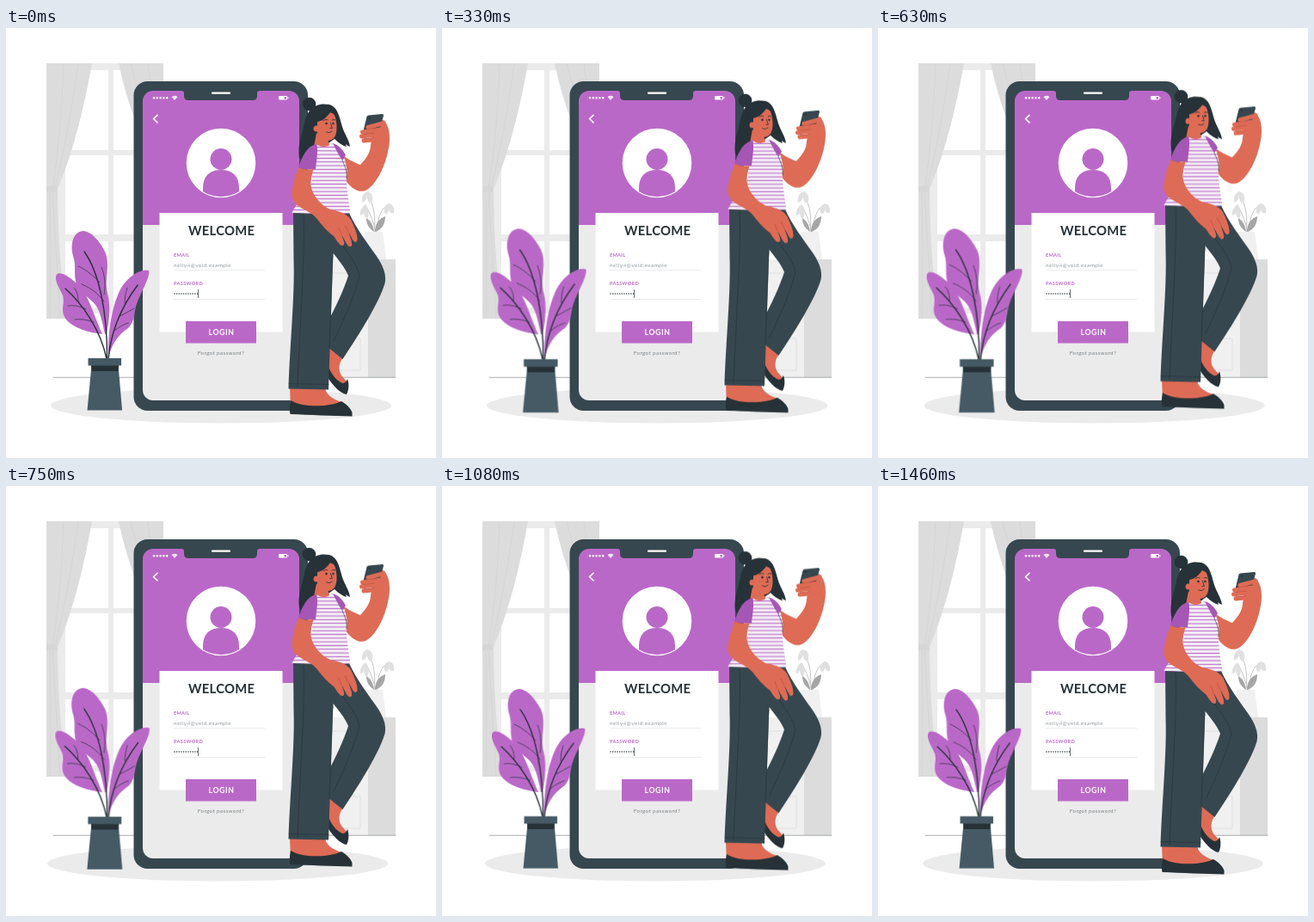
An HTML page for the animation above (1500 ms loop, 500 by 500 pixels).

```html
<!DOCTYPE html>
<html lang="en">
<head>
<meta charset="utf-8">
<title>Login</title>
<style>
html, body { margin: 0; width: 100%; height: 100%; overflow: hidden; background: #fff; }
svg { display: block; width: 100vw; height: 100vh; }
text { font-family: Lato, sans-serif; }
.accent { fill: #ba68c8; }
.slate { fill: #37474f; }
.ink { fill: #263238; }
.skin { fill: #de6b55; }
.line { fill: none; stroke: #263238; stroke-linecap: round; stroke-linejoin: round; }
.mid { text-anchor: middle; }
.bold { font-weight: 700; }

.shadow { animation: shake 1.5s ease infinite; }
.plant { transform-origin: 112px 342px; animation: swell 1.5s ease-in-out -30ms infinite; }
.woman { animation: float 1.5s ease-in-out -30ms infinite; }

@keyframes shake {
  0%, 100% { transform: translateX(0); }
  10%, 90% { transform: translateX(-1px); }
  20%, 80% { transform: translateX(2px); }
  30%, 50%, 70% { transform: translateX(-4px); }
  40%, 60% { transform: translateX(4px); }
}
@keyframes swell {
  0%, 58%, 100% { transform: scale(1); }
  20%, 45% { transform: scale(1.025); }
}
@keyframes float {
  0%, 100% { transform: translateY(0); }
  50% { transform: translateY(-9px); }
}
</style>
</head>
<body>
<svg viewBox="0 0 500 500">
  <defs>
    <pattern id="stripes" width="10" height="4.3" y="3.1" patternUnits="userSpaceOnUse">
      <path fill="#f5f0f6" d="M0 0h10v4.3H0z"/>
      <path class="accent" d="M0 1.6h10v1.1H0z"/>
    </pattern>
    <clipPath id="avatar"><circle cx="250" cy="157" r="39.3"/></clipPath>
  </defs>

  <!-- window -->
  <g>
    <path fill="#ebebeb" d="M60 41H183V332H60z"/>
    <path fill="#fff" d="M69 49h50v93H69zM125 49h51v93h-51zM69 148h50v92H69zM125 148h51v92h-51zM69 248h50v77H69zM125 248h51v77h-51z"/>
    <path fill="#dcdcdc" d="M47 41H100C92 86 80 140 60 187C60 240 64 290 71 338H47z"/>
    <path fill="none" stroke="#d0d0d0" stroke-width=".6" d="M67 41C65 100 60 150 54 186M84 41C76 100 66 150 57 186M54 190C57 240 60 290 63 338M51 190C52 240 52 290 51 338"/>
    <path fill="#d6d6d6" d="M47 184h12.500v7H47z"/>
    <path fill="#dcdcdc" d="M131 41H183V190C168 150 143 100 131 41z"/>
    <path fill="none" stroke="#d0d0d0" stroke-width=".6" d="M145 41C148 54 152 70 158 85M165 41L170 80"/>
  </g>

  <!-- cabinet and flowers -->
  <g>
    <path fill="#f0f0f0" d="M345 269h80v137h-80z"/>
    <path fill="#dcdcdc" d="M421 269h32v137h-32z"/>
    <path fill="none" stroke="#dcdcdc" stroke-width=".8" d="M360 361h52v37h-52zM360 285h52v60h-52z"/>
    <path fill="#f0f0f0" d="M417 237h21l4 32h-29z"/>
    <path fill="none" stroke="#c4c4c4" stroke-width="1" d="M428 237C430 220 428 205 421 196M430 237C426 222 422 212 418 207M431 237C432 220 438 206 445 207"/>
    <path fill="#e0e0e0" d="M420 190c6 1 8 8 5 14c-4-1-5-4-5-8c-1 4-3 6-6 7c-1-6 1-11 6-13zM418 205c4 4 5 11 2 17c-3-1-4-5-4-8c-1 3-2 4-4 4c-1-5 2-10 6-13zM445 204c5 1 7 5 6 11c-3 1-5-1-6-4c0 3-1 5-4 5c-3-5-1-10 4-12z"/>
    <path fill="#a6a6a6" d="M428 237c-1-8-4-13-9-16c0 7 3 12 9 16zM429 237c0-9 4-15 12-18c0 9-4 16-12 18z"/>
  </g>

  <ellipse class="shadow" cx="250" cy="439" rx="198" ry="20.500" fill="#ebebeb"/>
  <path class="line" stroke-width=".4" d="M55 406.300H453"/>

  <!-- phone -->
  <g>
    <rect class="slate" x="148.500" y="62" width="202.500" height="383" rx="16"/>
    <path fill="#ebebeb" d="M159 228H341V421a12 12 0 0 1-12 12H171a12 12 0 0 1-12-12z"/>
    <path class="accent" d="M159 229V85a12 12 0 0 1 12-12H204q3 0 3 3v3q0 5 5 5H287q5 0 5-5v-3q0-3 3-3H329a12 12 0 0 1 12 12V229z"/>
    <path fill="none" stroke="#fff" stroke-width="2.200" stroke-linecap="round" d="M240 75.700h20"/>
    <path fill="none" stroke="#fff" stroke-width="2.600" stroke-linecap="round" stroke-dasharray="0 3.800" d="M172 81.300h15.500"/>
    <path fill="#fff" opacity=".85" d="M192.500 80q3.500-2.700 7 0l-3.500 4z"/>
    <rect x="317" y="79" width="10" height="4.600" rx="1" fill="#fff"/>
    <path class="accent" d="M323.500 80h2.500v2.600h-2.500z"/>
    <path fill="#fff" d="M327.500 80.300h1v2h-1z"/>
    <path fill="none" stroke="#fff" stroke-width="1.600" stroke-linecap="round" stroke-linejoin="round" d="M176 101.300l-4.500 4.200l4.500 4.300"/>

    <circle cx="250" cy="157" r="40.300" fill="#fff"/>
    <g class="accent" clip-path="url(#avatar)">
      <circle cx="250" cy="152.500" r="12.500"/>
      <path d="M229 198V186C229 172 237 165 250 165S271 172 271 186V198z"/>
    </g>

    <path fill="#fff" d="M178.500 215H321.500V353.500H178.500z"/>
    <text class="ink bold mid" x="250.700" y="241" font-size="14.800" letter-spacing=".3">WELCOME</text>
    <text class="accent bold" x="195" y="266" font-size="5.600" letter-spacing=".3">EMAIL</text>
    <text x="195" y="278.300" font-size="6.400" letter-spacing=".5" font-weight="300" fill="#37474f">nelly4@veld.example</text>
    <text class="accent bold" x="195" y="299.300" font-size="5.600" letter-spacing=".35">PASSWORD</text>
    <path fill="none" stroke="#d4d4d4" stroke-width=".5" d="M195 281.600H301M195 315.500H301"/>
    <path class="line" stroke-width="1.500" stroke-dasharray="0 2.650" d="M196 309h26.600"/>
    <path class="line" stroke-width=".7" d="M223.500 304.500v9"/>
    <path class="accent" d="M209 341h82v25.500h-82z"/>
    <text class="bold mid" x="250.500" y="357.300" font-size="8.700" letter-spacing=".6" fill="#fff">LOGIN</text>
    <text class="mid" x="250" y="380" font-size="6.400" letter-spacing=".35" font-weight="300" fill="#263238">Forgot password?</text>
  </g>

  <!-- plant -->
  <g class="plant">
    <g class="accent">
      <path d="M112 356C96 354 78 349 70 339C62 329 69 321 66 311C62 302 56 294 58.500 287C62 282 72 288 80 295C95 306 100 329 112 356z"/>
      <path d="M119 384C118 351 124 320 134 302C143 288 156 280 166 282C168 289 158 305 153 318C148 329 151 340 142 349C132 356 124 364 119 384z"/>
      <path d="M115 356C112 343 110 330 104 322C97 313 86 309 82 298C78 287 82 276 78 265C74 250 79 236 90 236C100 237 109 248 115 260C122 276 114 291 118 308C122 324 120 340 117 356z"/>
    </g>
    <path class="line" stroke-width="1.400" d="M91 260C108 284 118 330 117.500 385M69 303C88 320 110 350 117 385M153 299C135 323 122 350 119 385"/>
    <path class="line" stroke-width=".7" d="M109 296C100 286 91 280 84 277M114 318C106 307 96 301 88 298M114 310C116 300 115 287 111 278M84 318C84 310 82 305 79 302M93 327C85 323 78 322 72 323M102 342C94 339 86 338 80 339M138 320C138 313 139 307 141 302M132 335C139 332 145 328 149 326M126 352C132 347 138 344 142 343"/>
    <path fill="#455a64" d="M99.500 392h31l4.500 52.500H94.500z"/>
    <path class="ink" d="M99 392h32l-.7 7h-30.600z"/>
    <path fill="#455a64" d="M95.500 384H134v8.500H95.500z"/>
  </g>

  <!-- woman -->
  <g class="woman">
    <!-- rear leg -->
    <path class="skin" d="M374 366L392 383C387 390 386 397 390 404L397 412L390 420L375 402z"/>
    <path class="ink" d="M374.500 392C377 401 384 410 391 413C394 413 396 411 397 408C399 413 399 421 396 426C388 425 379 414 374.500 407z"/>
    <path class="slate" d="M350 215H399C407 233 421 251 430 264C438 275 443 287 440.500 297C434 319 411 356 391.500 385L374 371V342C383 325 393 304 398 288C394 278 385 268 379 260L350 262z"/>
    <path class="line" stroke-width=".6" d="M387 247C397 261 408 274 411 288C406 309 394 337 381 364"/>

    <!-- front leg -->
    <path class="skin" d="M330 417H371C371 426 380 432 391 435L385 444H331z"/>
    <path class="ink" d="M331 433C341 439 355 440 370 439C379 438 386 436 390 434C395 437 401 442 402.500 447V451.500C380 451 352 450 330.500 449C329.500 444 330 437 331 433z"/>
    <path class="slate" d="M334 214H393C388 235 381 250 380 270L375 420.500L328.500 419.500C330 370 336 310 334.500 270z"/>
    <path class="line" stroke-width=".6" d="M346 217C348 260 342 340 339 417M380 265L376 372M329 413.500L375 414.500"/>

    <!-- hair behind -->
    <circle class="ink" cx="352.500" cy="88.500" r="7.800"/>
    <path class="ink" d="M376 89C358 86 350 96 347 111C344 126 339 134 341 151C349 158 362 150 368 139L382 129C387 134 392 137 396 138L395 135Q397 137 400 138C399 130 394 124 391 115C387 100 385 92 376 89z"/>

    <!-- raised arm -->
    <path class="skin" d="M389 146C398 153 406 157 412 159C419 152 424 144 424 136L428 116L434 112C434 105 441 106 442 111C446 117 447 128 445 139C442 158 432 180 420 188C411 193 403 187 397 180L389 170z"/>

    <!-- shirt -->
    <path class="skin" d="M361 122L374 129L377 139L368 143L358 138z"/>
    <path fill="url(#stripes)" d="M361 135C366 139 374 139 379 134L390 141C394 153 398 163 396 175C396 190 399 204 400.500 215.500C378 216 352 216 332.500 215C338 202 353 191 356 178V158z"/>
    <path fill="#a657b5" d="M361.500 135C352 137 347 143 340 162C346 165 353 165 360 164C361 154 363 145 361.500 135zM380 134C387 136 392 142 395 148L391 154C387 148 384 142 380 134z"/>
    <path class="line" stroke-width=".6" d="M391 154C394 160 397 167 396 175"/>

    <!-- lowered arm -->
    <path class="skin" d="M340.500 162C346 165 352 165 357.500 164C355 174 353 180 356 189C360 199 368 207 377 211C389 213 400 217 403 227C406 234 409 240 408.500 247C406 251 404 248 402 244L398 237C400 243 403 249 402 253C399 257 396 251 394 247L390 240C392 246 395 251 392 253C388 254 384 246 381 242C374 237 367 229 361 221C352 211 336 209 333 198C331 190 335 175 340.500 162z"/>
    <path fill="none" stroke="#b84f3f" stroke-width=".7" d="M390 240L387 232M398 237L394 229"/>

    <!-- face -->
    <path class="skin" d="M361 106C362 99 370 95 381 99C385 107 386 121 382 127C377 134 367 131 362 123z"/>
    <path class="ink" d="M356 104C360 91 374 87 382 94C384 98 385 102 385 106C383 101 380 99 377 98C373 104 368 108 362 109L362 122L355 127z"/>
    <circle class="skin" cx="361" cy="117" r="3.500"/>
    <circle class="ink" cx="372.500" cy="111" r="1.300"/>
    <circle class="ink" cx="380.500" cy="111" r="1.200"/>
    <path class="line" stroke-width=".8" d="M369 107.500q3-2 5-.7M379 107q2-1.500 4 0M377.500 110.500l1.800 6h-2.500M372.500 121q4 2 6.500-.8"/>

    <!-- handset -->
    <path class="slate" d="M421.500 101.500L437.500 100Q439.500 100 439 102L434 119.500L418 120Q415.500 120 416 117.500L419.500 103Q420 101.700 421.500 101.500z"/>
    <circle class="ink" cx="423" cy="104.600" r="1.200"/>
    <path fill="none" stroke="#de6b55" stroke-width="5" stroke-linecap="round" d="M438 111L421 115.500M436 118L414.500 121M436 123L413.500 126M436 129L416 131"/>
    <path fill="none" stroke="#b84f3f" stroke-width=".6" d="M419 118L430 116.500M416 123.500L429 122M416 128.700L428 127.500"/>
  </g>
</svg>
</body>
</html>
```
